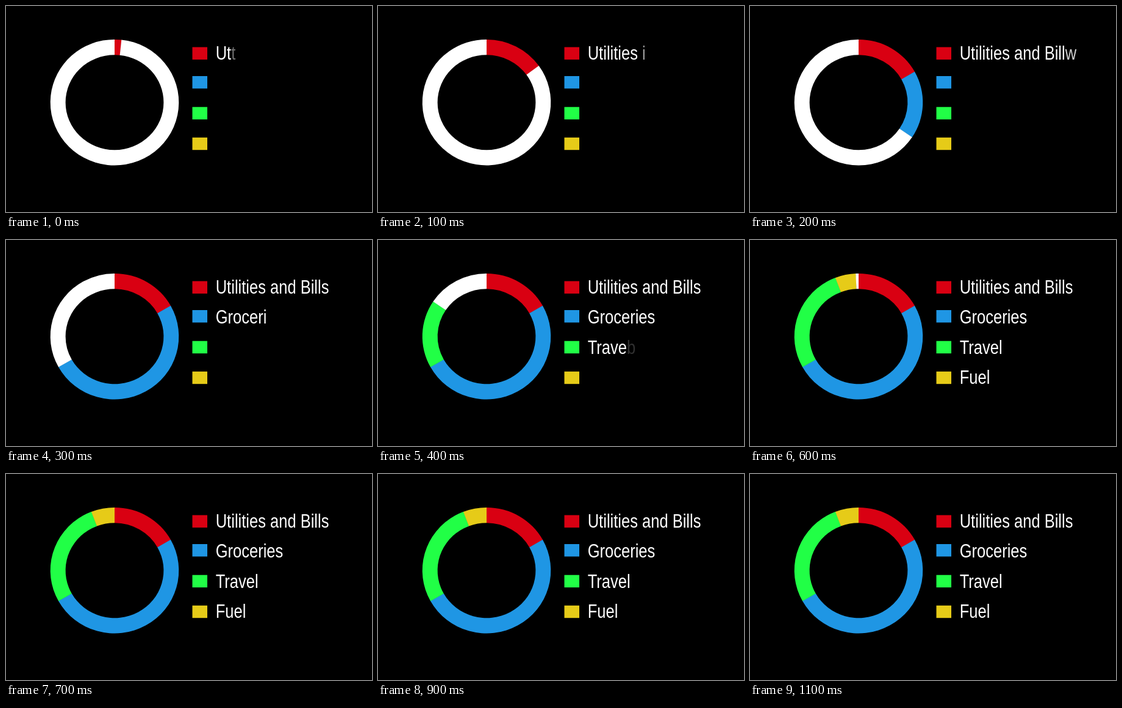
Write an HTML page with a canvas that moves like this. It is 600 px wide and 338 px high and loops after 1200 ms.

```html
<!DOCTYPE html>
<html lang="en">
<head>
<meta charset="utf-8">
<title>Spending ring</title>
<style>
html, body { margin: 0; width: 100%; height: 100%; overflow: hidden; background: #000; }
canvas { display: block; width: 600px; height: 338px; }
</style>
</head>
<body>
<canvas id="stage" width="600" height="338"></canvas>
<script>
const ctx = document.getElementById('stage').getContext('2d');

const LOOP = 1200, STEP = 100;
const SWEEP = 167, SWEEP_START = -33.4;   // ms per ring segment
const TYPED_AT_START = 2.43, TYPE_RATE = 0.0819;   // characters, characters per ms
const MAX_SHIFT = 20;

const items = [
  { label: 'Utilities and Bills', color: '#d90012', to: 61,  top: 67.5,  base: 88 },
  { label: 'Groceries',           color: '#1f96e4', to: 241, top: 115,   base: 137.4 },
  { label: 'Travel',              color: '#21ff46', to: 339, top: 165.7, base: 187 },
  { label: 'Fuel',                color: '#e6cb18', to: 360, top: 215.8, base: 236.4 }
];

const clamp = x => Math.max(0, Math.min(1, x));
const smooth = x => x * x * (3 - 2 * x);
const rad = deg => (deg - 90) * Math.PI / 180;

function ringPart(from, to, color) {
  if (to <= from) return;
  ctx.beginPath();
  ctx.ellipse(178, 158.2, 105.3, 103.3, 0, rad(from), rad(to));
  ctx.ellipse(178, 158.2, 80.4, 78, 0, rad(to), rad(from), true);
  ctx.closePath();
  ctx.fillStyle = color;
  ctx.fill();
}

function drawRing(t) {
  const overlap = 0.2;   // hides seams between neighbours
  let from = 0, end = 0;
  items.forEach((item, i) => {
    const p = smooth(clamp((t - SWEEP_START - i * SWEEP) / SWEEP));
    const to = from + (item.to - from) * p;
    if (p > 0) {
      ringPart(i ? from - overlap : 0, to, item.color);
      end = to;
    }
    from = item.to;
  });
  if (end < 360) ringPart(end - overlap, 360, '#fff');
}

// A letter still fading in appears further along the alphabet.
function shiftLetter(ch, p) {
  const n = Math.round(MAX_SHIFT * (1 - p));
  if (!/[a-z]/i.test(ch)) return ch;
  const a = ch < 'a' ? 65 : 97;
  return String.fromCharCode(a + (ch.charCodeAt(0) - a + n) % 26);
}

function drawLabel(label, base, typed) {
  if (typed <= 0) return;
  const whole = Math.min(label.length, Math.floor(typed));
  const done = label.slice(0, whole);
  ctx.save();
  ctx.translate(343.7, base);
  ctx.scale(0.823, 1);
  ctx.fillStyle = '#fff';
  ctx.fillText(done, 0, 0);
  if (whole < label.length) {
    const p = typed - whole;
    ctx.globalAlpha = p;
    ctx.fillText(shiftLetter(label[whole], p), ctx.measureText(done).width, 0);
  }
  ctx.restore();
}

function draw(t) {
  ctx.fillStyle = '#000';
  ctx.fillRect(0, 0, 600, 338);
  drawRing(t);
  ctx.font = '31px "Liberation Sans", Arial, sans-serif';
  let typed = TYPED_AT_START + TYPE_RATE * t;
  for (const { label, color, top, base } of items) {
    ctx.fillStyle = color;
    ctx.fillRect(305.5, top, 24.5, 20.4);
    drawLabel(label, base, typed);
    typed -= label.length + 1;
  }
}

function tick() {
  const t = performance.now() % LOOP;
  draw(Math.floor(t / STEP) * STEP);
  requestAnimationFrame(tick);
}
tick();
</script>
</body>
</html>
```
